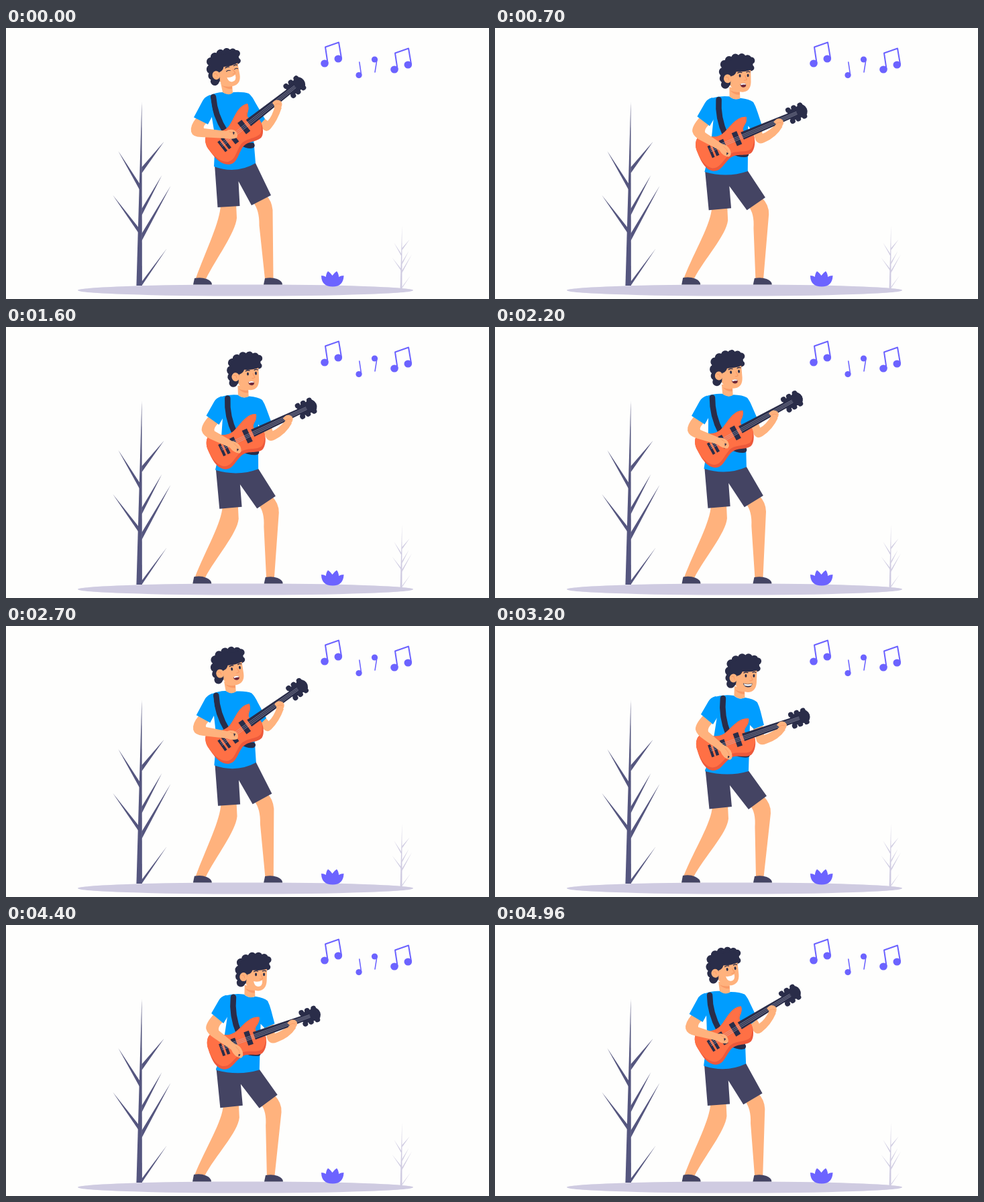
Recreate the animation shown at these times as an HTML page with a canvas. Size 720 by 405 pixels, loop 5 s.

```html
<!DOCTYPE html>
<html>
<head>
<meta charset="utf-8">
<style>
html, body { margin: 0; width: 100%; height: 100%; overflow: hidden; background: #fefefd; }
canvas { display: block; width: 720px; height: 405px; }
</style>
</head>
<body>
<canvas id="stage" width="720" height="405"></canvas>
<script>
const ctx = document.getElementById('stage').getContext('2d');
const LOOP = 5, STEP = 0.05, DEG = Math.PI / 180;
const DARK = '#2a2d49', SHORTS = '#444463', BLUE = '#009dff', SKIN = '#ffb27d', SHADE = '#f99a66';
const ORANGE = '#ff7045', RUST = '#ed593b', VIOLET = '#6c63ff', LILAC = '#cfcbe1', BARK = '#55567f';

// Swing phase in degrees over seconds: 0 leans back, 180 leans forward.
const PHASE = [[0, 0], [0.7, 234], [1.6, 472], [2.2, 632], [3.2, 895], [3.9, 1123], [4.96, 1369], [5, 1378]];

const lerp = (a, b, u) => a + (b - a) * u;

function phaseAt(t) {
  const i = Math.max(1, PHASE.findIndex(k => k[0] >= t));
  const [t0, p0] = PHASE[i - 1], [t1, p1] = PHASE[i];
  return lerp(p0, p1, (t - t0) / (t1 - t0));
}

// Blend two paths that share the same commands.
function mix(back, front, u) {
  const ends = front.match(/-?[\d.]+/g);
  let i = 0;
  return back.replace(/-?[\d.]+/g, n => lerp(+n, +ends[i++], u).toFixed(2));
}

function fill(color, path) {
  ctx.fillStyle = color;
  ctx.fill(new Path2D(path));
}

function line(color, width, path) {
  ctx.strokeStyle = color;
  ctx.lineWidth = width;
  ctx.stroke(new Path2D(path));
}

function oval(color, x, y, rx, ry = rx) {
  ctx.fillStyle = color;
  ctx.beginPath();
  ctx.ellipse(x, y, rx, ry, 0, 0, 7);
  ctx.fill();
}

function placed(x, y, angle, draw) {
  ctx.save();
  ctx.translate(x, y);
  ctx.rotate(angle * DEG);
  draw();
  ctx.restore();
}

function tree(x, y, scale, color) {
  ctx.save();
  ctx.translate(x, y);
  ctx.scale(scale, scale);
  fill(color, 'M0 0L0.5 275H-8Z');
  const twigs = [[33, 60, 98, 107], [-35, 74, 126, 136], [30, 110, 160, 170],
    [43, 126, 197, 208], [-43, 140, 193, 202], [37, 220, 269, 275]];
  for (const [tx, ty, top, low] of twigs) {
    const root = tx < 0 ? -1 : 0;
    fill(color, `M${tx} ${ty}L${root} ${top}V${low}Z`);
  }
  ctx.restore();
}

function beamedNotes(x, y) {
  oval(VIOLET, x, y, 5.8, 5.6);
  oval(VIOLET, x + 20.3, y - 7, 5.8, 5.6);
  line(VIOLET, 2, `M${x + 4.5} ${y - 1}L${x + 1} ${y - 24.5}L${x + 21} ${y - 31.5}L${x + 25} ${y - 8}`);
}

function scenery() {
  oval(LILAC, 357, 392, 250, 8.6);
  tree(202.4, 110, 1, BARK);
  tree(590.3, 296, 0.338, LILAC);
  beamedNotes(475, 53);
  beamedNotes(579, 62);
  oval(VIOLET, 526, 70.5, 4.6);
  line(VIOLET, 1.6, 'M529.6 70L526.8 51');
  oval(VIOLET, 549.5, 47, 4.6);
  line(VIOLET, 1.6, 'M553 47L550 66');
  fill(VIOLET, 'M470 370Q474 370 477 372Q477 367 480 363.5Q484 366 486.5 370Q489 366 493 363.5' +
    'Q496 367 496 372Q499 370 503.5 370Q503 386.5 487 386.5Q470 386.5 470 370Z');
}

function legs(part) {
  fill(SKIN, part('M320 264C319 290 299 330 283 374L298 375C313 345 342 306 344 284L343 262Z',
                  'M324 269C323 294 298 332 281 374L296 375C312 345 346 310 348 288L347 267Z'));
  fill(SKIN, part('M368 260Q378 272 377.5 295L386 375H398.5L397.5 272Q396 258 388 250Z',
                  'M380 268Q389 278 387.5 300L389 375H400.5L411 280Q412 266 400 254Z'));
  fill(SHORTS, part('M279 383.5L281 374Q291 372 299 375Q307 378 307 383.5Z',
                    'M278 383.5L280 373Q290 371 298 374.5Q306 378 306 383.5Z'));
  fill(SHORTS, part('M384 383.5L386 374Q396 372 404 375Q412 378 412 383.5Z',
                    'M385 383.5L387 374Q397 372 405 375Q413 378 413 383.5Z'));
  fill(SHORTS, part('M311 204L315.5 268L348.5 266L346.5 229L366 265L395 250L371 200Z',
                    'M313.5 214L319.5 273.5L353 270L350 238L378 274L405 254L377 215Z'));
}

function torso(part) {
  fill(SKIN, part('M373 140L383 151Q388 157 394 151Q405 138 411 119L401 116Q397 132 390 139L384 134Z',
                  'M384 150L390 172Q395 180 404 176Q423 170 433 155L424 150Q412 160 401 163L399 148Z'));
  fill(BLUE, part(
    'M303 101Q314 96 323 96Q331 101 339 96Q354 95 362 98Q367 102 372 112L386 136L372 151L367 140L372 202Q343 219 310 207L312 165L306 128Z',
    'M327 106Q342 102 356 104Q364 111 373 107Q386 109 391 114Q394 120 396 128L401 148L386 154L380 148L378 217Q347 226 313 217L324 180L331 136Z'));
  fill(SKIN, part('M320 82L323 96Q331 102 338 97L337 83Z', 'M357 90L356.5 104Q364 111 372.5 107L372 93Z'));
  fill(SHADE, part('M322 86Q330 89 337 87L337 91Q329 92 322 86Z', 'M358 95Q365 99 372 98L372 102Q363 102 358 95Z'));
  line(DARK, 8.5, part('M309 103Q311 130 327 155', 'M340 108Q337 135 348 162'));
  line(DARK, 8.5, part('M350 171Q361 177 366.5 175.5', 'M355 188Q366 193 376 192'));
}

function neckAndHardware() {
  ctx.fillStyle = DARK;
  ctx.fillRect(15, -11, 8, 21);
  ctx.fillRect(-7, -8, 7, 20);
  ctx.fillRect(-19, -8, 4.5, 20);
  ctx.fillRect(-26, -7, 4, 19);
  fill(DARK, 'M28 -7L106 -5.5V3.5L28 5Z');
  oval(DARK, 116, -1, 15, 9);
  oval(DARK, 124, -1, 8.5, 10);
  for (const x of [106, 115, 125]) for (const side of [-1, 1]) oval(DARK, x, side * 8.8 - 1, 4);
  for (const y of [-3.5, -1, 1.5]) line('#b9bacb', 0.5, `M-24 ${y + 1}L116 ${y * 0.75 - 0.2}`);
}

function guitar(u) {
  placed(lerp(340, 344, u), lerp(160, 176.5, u), 19 * u, () => {
    ctx.save();
    ctx.translate(-340, -160);
    const body = 'M360 113Q363 119 360 127Q358 135 366 136L377 136C383 143 385 157 381 163' +
      'C374 171 361 168 353 178C345 190 345 202 333 204C318 205 308 189 301 180' +
      'C296 172 295 161 302 158C311 153 321 159 332 147C340 137 344 116 360 113Z';
    fill(RUST, body);
    ctx.clip(new Path2D(body));
    fill(ORANGE, 'M290 105H377C381 143 382 153 379 158C372 166 358 164 350 174C342 187 342 197 331 200' +
      'C317 201 304 185 298 176L285 165Z');
    ctx.restore();
    placed(0, 0, -38, neckAndHardware);
  });
}

function arms(part) {
  fill(SKIN, part('M397 112Q401 106 407 108Q413 110 411 117Q408 124 402 122Q399 119 400 116Z',
                  'M420 148Q425 141 431 143Q437 146 434 152Q430 159 423 157Q419 154 424 151Z'));
  line(SHADE, 0.8, part('M402 114Q406 112 409 114', 'M424 150Q428 147 432 149'));
  fill(SKIN, part(
    'M284 134Q274 146 276 155Q278 163 291 163L328 165Q338 167 344 164Q347 158 341 153Q334 150 328 154L295 150Q293 147 300 141Z',
    'M311 133Q298 147 299 155Q301 163 312 170L336 187Q340 198 350 200Q355 199 353 190Q350 181 341 178L318 158Q316 153 324 145Z'));
  line(SHADE, 0.9, part('M333 155Q339 156 342 160', 'M343 183Q349 188 349 194'));
  fill(DARK, part('M338 155L341 156L339 160Z', 'M347 194L350 195L347 198Z'));
  fill(BLUE, part('M304 100Q296 103 293 109L280 133.5L301 144L309 129L305 104Z',
                  'M329 105Q321 107 318 113L307 132L325 147L333 134L333 110Z'));
}

function mouth(t) {
  if (t < 0.4 || t >= 4.4) {
    fill('#fff', 'M370.5 84Q377 86 383.5 82.5Q384 92 377 92Q371.5 91.5 370.5 84Z');
  } else if (t >= 2.9 && t < 3.5) {
    fill(DARK, 'M370 85Q377 87.5 383.5 85Q384 91 377 91Q371 90.5 370 85Z');
    fill('#fff', 'M371 85.7Q377 88 383 85.7L382.5 88.5Q377 90 372 88.5Z');
  } else {
    fill('#6d2638', 'M374 86.5Q378 84.5 382 86Q384 91 379 91.5Q374 91 374 86.5Z');
    fill('#fff', 'M374.5 86Q378 84.5 382 86L382 87.7Q378 86.8 375 88Z');
  }
}

function head(t, u) {
  placed(lerp(326, 370, u), 60.3 + 5.5 * u + 4.7 * u * u, -12 * (1 - u), () => {
    ctx.translate(-370, -70);
    const curls = [[352, 56, 6.5], [359, 50, 6.2], [368.5, 47, 6.2], [378, 46.8, 6], [386.5, 49, 5.8],
      [392, 52, 5.2], [391.5, 63, 4.3], [350, 67, 7], [350, 77, 6.5], [351.5, 86, 6.3]];
    for (const curl of curls) oval(DARK, ...curl);
    fill(DARK, 'M352 54L365 49L388 50L394 56V66L362 84L355 91L349 72Z');
    fill(SKIN, 'M361 74Q367 73 369 67.5Q381 69 390.5 66L390 84Q389 98 377 98.5Q364 98 359 88Z');
    oval(SKIN, 355.5, 77.5, 5.8, 6.5);
    line(SHADE, 1, 'M353 75Q357 74 357 79');
    line(DARK, 1.3, 'M371 69.7Q374 68 377 69.3M384 69Q387 67.5 389 69');
    if (t < 0.15) {
      line(DARK, 1, 'M371.5 75Q374.5 73 377.5 75M384 74.5Q386.5 72.8 389 74.5');
    } else {
      oval(DARK, 374, 74, 1.5, 2.4);
      oval(DARK, 386, 74, 1.5, 2.4);
    }
    line(SHADE, 1.2, 'M381.5 74L384 80Q382 81.5 380 81');
    mouth(t);
  });
}

function draw(now) {
  const t = Math.floor((now / 1000 % LOOP) / STEP + 1e-6) * STEP;
  const u = (1 - Math.cos(phaseAt(t) * DEG)) / 2;
  const part = (back, front) => mix(back, front, u);
  ctx.fillStyle = '#fefefd';
  ctx.fillRect(0, 0, 720, 405);
  ctx.lineCap = ctx.lineJoin = 'round';
  scenery();
  legs(part);
  torso(part);
  guitar(u);
  arms(part);
  head(t, u);
}

let start;
function tick(now) {
  start ??= now;
  draw(now - start);
  requestAnimationFrame(tick);
}
draw(0);
requestAnimationFrame(tick);
</script>
</body>
</html>
```
